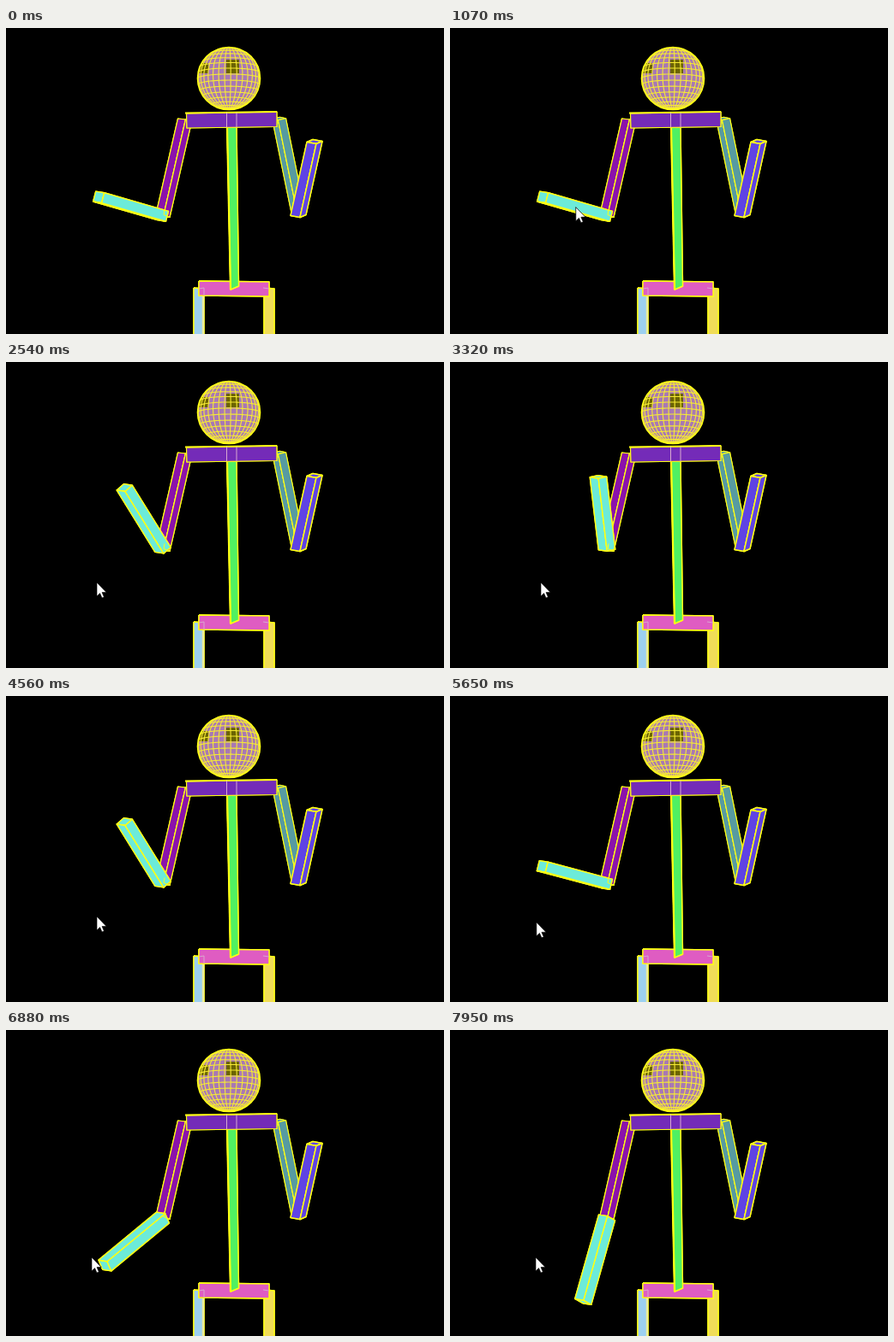
Write an HTML page with a canvas that moves like this. It is 511 by 358 pixels and loops after 8 s.

```html
<!DOCTYPE html>
<html>
<head>
<meta charset="utf-8">
<style>
html, body { margin: 0; width: 100%; height: 100%; overflow: hidden; background: #000; }
canvas { display: block; }
</style>
</head>
<body>
<canvas id="stage" width="511" height="358"></canvas>
<script>
const ctx = document.getElementById('stage').getContext('2d');
const YELLOW = '#ffff14', PALE = '#d8a8d0';
const LOOP = 8000, TICK = 77;
const clamp = (x, lo, hi) => Math.min(hi, Math.max(lo, x));

function line(points, width = 1.4, color = YELLOW) {
  ctx.beginPath();
  points.forEach(([x, y]) => ctx.lineTo(x, y));
  ctx.strokeStyle = color;
  ctx.lineWidth = width;
  ctx.stroke();
}

function poly(points, fill, width = 1.4, stroke = YELLOW) {
  line([...points, points[0]], width, stroke);
  ctx.fillStyle = fill;
  ctx.fill();
  ctx.stroke();
}

// The four corners of a box end, spanned by a side and a depth vector
const corners = ([x, y], side, depth) => [[-1, -1], [-1, 1], [1, 1], [1, -1]].map(([u, w]) => [
  x + (u * side[0] + w * depth[0]) / 2,
  y + (u * side[1] + w * depth[1]) / 2
]);

function area(points) {
  return points.reduce((sum, [x, y], i) => {
    const [nx, ny] = points[(i + 1) % points.length];
    return sum + x * ny - nx * y;
  }, 0);
}

function box(from, to, side, depth, fill, width) {
  const a = corners(from, side, depth), b = corners(to, side, depth);
  const walls = a.map((p, i) => {
    const j = (i + 1) % 4;
    return [b[j], b[i], p, a[j]];
  });
  // The wall nearest the viewer fixes which winding is visible
  const facing = Math.sign(area(walls[1]));
  for (const face of [b, [...a].reverse(), ...walls]) {
    if (area(face) * facing > 0) poly(face, fill, width);
  }
}

// Wireframe sphere, tilted slightly as seen from below
function drawHead() {
  const cx = 260, cy = 59, r = 36.5, tilt = 0.14, step = Math.PI / 16;
  const disc = () => {
    ctx.beginPath();
    ctx.arc(cx, cy, r, 0, 7);
  };
  const project = (lon, lat) => {
    const y = Math.sin(lat), z = Math.cos(lat) * Math.cos(lon);
    return [
      cx + r * Math.cos(lat) * Math.sin(lon),
      cy - r * (y * Math.cos(tilt) + z * Math.sin(tilt)),
      z * Math.cos(tilt) - y * Math.sin(tilt)
    ];
  };
  const curve = at => {
    const points = Array.from({ length: 65 }, (_, i) => at((i / 64 - 0.5) * Math.PI));
    line(points.filter(p => p[2] >= 0), 1.1, '#f6ea34');
  };
  disc();
  ctx.fillStyle = '#a878b4';
  ctx.fill();
  ctx.save();
  ctx.clip();
  ctx.fillStyle = '#6b6400';
  ctx.fillRect(257, 37, 15, 16);
  ctx.fillRect(225, 41, 11, 12);
  for (let i = -7; i < 8; i++) {
    curve(u => project(u * 1.1, i * step));
    curve(u => project(i * step + 0.06, u));
  }
  ctx.restore();
  disc();
  ctx.strokeStyle = YELLOW;
  ctx.lineWidth = 1.6;
  ctx.stroke();
}

function drawLeg(x, fill) {
  poly([[x, 304], [x + 12, 305], [x + 12, 360], [x, 360]], fill);
}

function drawTorso() {
  drawLeg(219, '#9cd0f0');
  line([[230, 305], [230, 360]], 2.4, '#e8eaa0');
  drawLeg(301, '#f0dc58');
  poly([[225, 296], [307, 297], [307, 314], [225, 313]], '#df5cc2');
  line([[225, 305], [231, 304], [231, 313]], 1, PALE);
  line([[300, 304], [307, 305]], 1, PALE);
  poly([[258, 116], [269, 116], [271.5, 302], [262, 306]], '#50f062');
  line([[258, 116], [262, 306]], 2.2);
  poly([[210.5, 100], [316, 98], [316, 115.5], [211, 117]], '#742bb8', 1.2);
  line([[209, 99.5], [316, 98]], 2.2);
  for (const x of [257.5, 269]) line([[x, 99], [x, 116]], 1, PALE);
}

function drawRightArm() {
  box([318.5, 106], [341.5, 218.5], [9, -2], [7, 1.5], '#579ba1', 1.2);
  box([341, 219], [360, 133], [7, -3], [11, 2], '#5f43e4');
}

// The forearm swings by an angle in degrees above horizontal
function drawLeftArm(degrees) {
  const a = degrees * Math.PI / 180, c = Math.cos(a), s = Math.sin(a);
  const shoulder = [208.5, 108], elbow = [183, 219.5], hand = [175 - 70 * c - 2 * s, 228.5 - 94 * s];
  const side = [7, 3], depth = [9, 1];
  box(shoulder, elbow, side, depth, '#8b12ab', 1.2);
  box(elbow, hand, [9.5 * s, -10.5 * c - 2], [10, 1.6], '#6cebd9');
  // The upper arm's near edge shows through at the joint
  const [, near, far] = corners(elbow, side, depth);
  line([[near[0] + 1, near[1] - 6], near, far, [far[0] + 1, far[1] - 6]], 1);
}

// Three degrees per tick: up to vertical, a rest, then down
function armAngle(t) {
  const up = Math.floor((t - 1460) / TICK), down = Math.floor((t - 3870) / TICK + 1.15);
  return clamp(18 + 3 * up, 19, 90) - 3 * Math.max(0, down);
}

// The pointer glides in from below, then makes three short moves
function drawPointer(t) {
  const time = Math.floor((t + 10) / TICK) * TICK;
  const glide = (from, to) => clamp((time - from) / (to - from), 0, 1);
  const enter = glide(225, 920), nudge = glide(1065, 1150), drop = glide(1295, 1460), drift = glide(5000, 5730);
  const x = 412 - 263 * enter - 14 * nudge - 29 * drop - 6 * drift;
  const y = 362 - 150 * enter - 15 * nudge + 61 * drop + 8 * drift;
  const arrow = [[0, 0], [0, 16], [3.6, 12.6], [6, 18], [8.4, 17], [6, 11.6], [11, 11.4]];
  poly(arrow.map(([dx, dy]) => [x + dx, y + dy]), '#fff', 0.6, '#000');
}

function draw(t) {
  ctx.fillStyle = '#000';
  ctx.fillRect(0, 0, 511, 358);
  drawHead();
  drawRightArm();
  drawLeftArm(armAngle(t));
  drawTorso();
  drawPointer(t);
}

ctx.lineJoin = 'round';
const start = performance.now();
function frame() {
  draw((performance.now() - start) % LOOP);
  requestAnimationFrame(frame);
}
frame();
</script>
</body>
</html>
```
